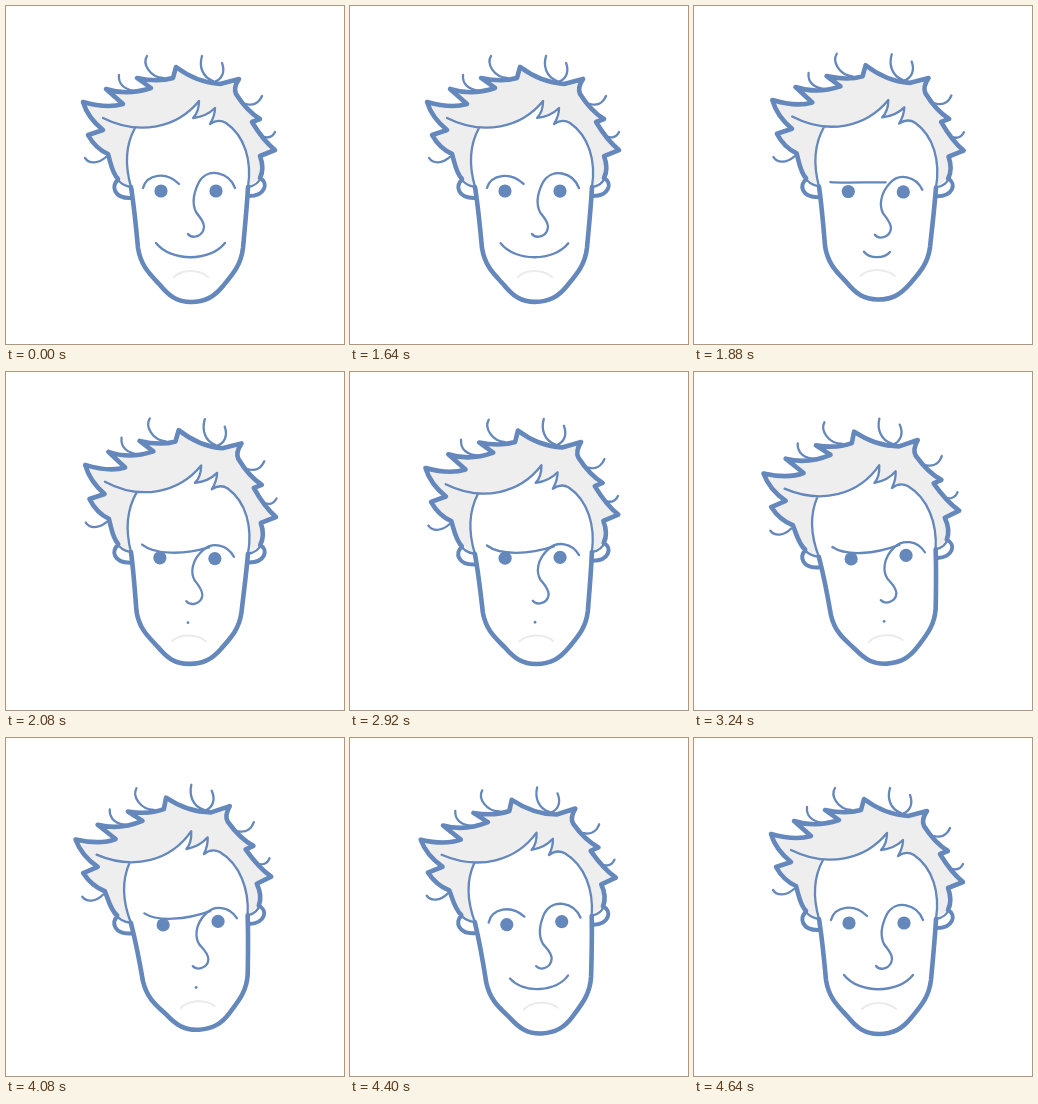
An HTML page with a canvas that plays this animation: 338 by 338 pixels, repeating every 5.32 s.

```html
<!DOCTYPE html>
<html lang="en">
<head>
<meta charset="utf-8">
<title>Changing face</title>
<style>
html, body { margin: 0; width: 100%; height: 100%; overflow: hidden; background: #fff; }
canvas { display: block; width: 100%; height: 100%; }
</style>
</head>
<body>
<canvas id="stage"></canvas>
<script>
const SIZE = 338, LOOP = 5320, STEP = 40;
const BLUE = '#6487bc', HAIR = '#eeeeef', CREASE = '#ebebeb';
const THICK = 4.6, THIN = 2.3;
const canvas = document.getElementById('stage');
const ctx = canvas.getContext('2d');

// Paths are strings of M, L and C commands; every pair of numbers is a point.
const parse = d => d.match(/[MLC][^MLC]*/g).map(part => ({
  cmd: part[0],
  nums: part.slice(1).trim().split(/[\s,]+/).map(Number)
}));

const fringe =
  ' C193 102 191 108 187 112 C196 111 204 107 209 102 C209 108 207 113 204 118' +
  ' C210 114 215 114 220 117 C239 130 246 155 242 181';
const jawLine =
  ' C241 200 239 220 237 242 C235 259 227 268 217 280 C208 291 199 296 185 296' +
  ' C171 296 163 290 154 279 C145 269 135 261 132 242 C130 220 128 200 125 181';

const hairEdge = parse(
  'M112 173 C106 167 105 158 102 148 C93 144 87 138 82 129 L97 124' +
  ' C87 116 80 106 77 96 C91 100 104 102 117 98 L100 83 C115 88 130 87 145 82' +
  ' L131 72 C145 75 157 75 167 72 L170 61 C182 70 198 77 214 78 L233 73' +
  ' C229 79 228 84 230 88 C237 99 244 107 254 113 L246 116 C252 126 259 136 269 144' +
  ' L254 150 C257 158 257 166 254 172');
const hairBase = parse('L242 181 L125 181');
const sideburns = parse(
  'M111 172 C114 178 119 180 125 181 M242 181 C248 180 253 177 255 171');
const skin = parse(
  'M125 181 C119 160 119 140 129 122 C154 122 178 112 193 95' + fringe + jawLine);
const hairline = parse(
  'M125 181 C119 160 119 140 129 122 M97 112 C133 130 171 122 193 95' + fringe);
const jaw = parse('M242 181' + jawLine);
const ears = [
  parse('M112 174 C105 179 107 193 126 192'),
  parse('M254 172 C263 177 259 190 243 190')
];
const curls = parse(
  'M141 50 C136 58 144 71 157 72 M113 69 C112 78 118 84 131 85' +
  ' M196 50 C193 60 196 71 207 75 M216 57 C219 65 217 73 208 76' +
  ' M256 90 C253 97 247 100 240 98 M269 126 C266 132 260 133 254 129' +
  ' M79 152 C83 158 92 158 100 151');
const crease = parse('M168 271 C176 263 193 263 202 271');

const brow = {
  calm: parse('M137 182 C141 168 160 165 173 178'),
  cross: parse('M137 172 C150 182 178 182 204 174')
};
const nose = {
  calm: parse('M229 182 C223 166 202 161 193 176 C186 190 187 200 190 206 C194 212 198 215 198 221 C197 231 186 233 182 228'),
  cross: parse('M229 183 C222 170 207 169 199 176 C186 187 186 200 190 207 C194 212 198 216 198 222 C197 231 186 233 182 228')
};
const smile = parse('M150 237 C165 256 204 256 219 237');

const mix = (a, b, k) => a + (b - a) * k;
const clamp = (v, lo = 0, hi = 1) => Math.max(lo, Math.min(hi, v));
const span = (t, a, b) => clamp((t - a) / (b - a));
const smooth = k => k * k * (3 - 2 * k);
const easeOut = k => 1 - (1 - k) ** 4;
const blend = (a, b, k) => a.map((part, i) => ({
  cmd: part.cmd,
  nums: part.nums.map((n, j) => mix(n, b[i].nums[j], k))
}));

function poseAt(t) {
  const frown = smooth(span(t, 1600, 2080));
  const turn = easeOut(span(t, 2880, 3240));
  const back = smooth(span(t, 4320, 4640));
  const mood = frown * (1 - smooth(span(t, 4040, 4400)));
  return {
    angle: mix(mix(0.8 * frown, -3.6, turn), 0, back) * Math.PI / 180,
    squash: frown * (1 - smooth(span(t, 4040, 4480))),
    mood,
    mouth: 1 - frown * (1 - smooth(span(t, 4040, 4520))),
    dx: mix(mix(-1.2 * frown, 2.4, turn), 0, back),
    dy: mix(mood * 1.2, 0, turn)
  };
}

function tilt(pose, x, y) {
  const c = Math.cos(pose.angle), s = Math.sin(pose.angle);
  x -= 185;
  y -= 190;
  return [185 + x * c - y * s, 190 + x * s + y * c];
}
// The hair stretches up and the jaw pulls in; both slide opposite ways with the turn.
const headMap = (pose, jawPull = 0.035) => (x, y) => {
  x += pose.dx * 0.7 * clamp((y - 170) / 60, -1, 1);
  if (y < 150) y += (y - 150) * 0.03 * pose.squash;
  if (y > 180) y -= (y - 180) * jawPull * pose.squash;
  return tilt(pose, x, y);
};
const featureMap = pose => (x, y) => {
  const [u, v] = tilt(pose, x, y);
  return [u + pose.dx, v + pose.dy];
};

function trace(parts, map) {
  for (const { cmd, nums } of parts) {
    const p = [];
    for (let i = 0; i < nums.length; i += 2) p.push(...map(nums[i], nums[i + 1]));
    if (cmd === 'M') ctx.moveTo(...p);
    else if (cmd === 'L') ctx.lineTo(...p);
    else ctx.bezierCurveTo(...p);
  }
}
function fill(parts, map, color) {
  ctx.beginPath();
  trace(parts, map);
  ctx.fillStyle = color;
  ctx.fill();
}
function stroke(parts, map, width, color = BLUE) {
  ctx.beginPath();
  trace(parts, map);
  ctx.lineWidth = width;
  ctx.strokeStyle = color;
  ctx.stroke();
}
function dot(x, y, r, map) {
  ctx.beginPath();
  ctx.arc(...map(x, y), r, 0, Math.PI * 2);
  ctx.fillStyle = BLUE;
  ctx.fill();
}

function draw(t) {
  const pose = poseAt(t);
  const head = headMap(pose), face = featureMap(pose);

  for (const ear of ears) {
    fill(ear, head, '#fff');
    stroke(ear, head, 4);
  }
  fill([...hairEdge, ...hairBase], head, HAIR);
  fill(skin, head, '#fff');
  stroke(sideburns, head, THIN);
  stroke(curls, head, THIN);
  stroke(hairline, head, THIN);
  stroke(hairEdge, head, THICK);
  stroke(jaw, head, THICK);

  stroke(crease, headMap(pose, 0.018), 2, CREASE);
  stroke(blend(brow.calm, brow.cross, pose.mood), face, THIN);
  stroke(blend(nose.calm, nose.cross, pose.mood), face, THIN);
  dot(155, 185, 6.6, face);
  dot(210, 185, 6.6, face);

  if (pose.mouth > 0.02) {
    const k = pose.mouth;
    stroke(smile, (x, y) => face(184 + (x - 184) * k, 250 + (y - 250) * k), THIN);
  } else {
    dot(184, 249.5, 1.4, face);
  }
}

function frame(now) {
  const ratio = window.devicePixelRatio || 1;
  const w = Math.round(innerWidth * ratio), h = Math.round(innerHeight * ratio);
  if (canvas.width !== w || canvas.height !== h) {
    canvas.width = w;
    canvas.height = h;
  }
  ctx.setTransform(1, 0, 0, 1, 0, 0);
  ctx.fillStyle = '#fff';
  ctx.fillRect(0, 0, w, h);
  ctx.setTransform(w / SIZE, 0, 0, h / SIZE, 0, 0);
  ctx.lineCap = 'round';
  ctx.lineJoin = 'round';
  draw(Math.floor((now % LOOP) / STEP) * STEP);
  requestAnimationFrame(frame);
}
frame(performance.now());
</script>
</body>
</html>
```
